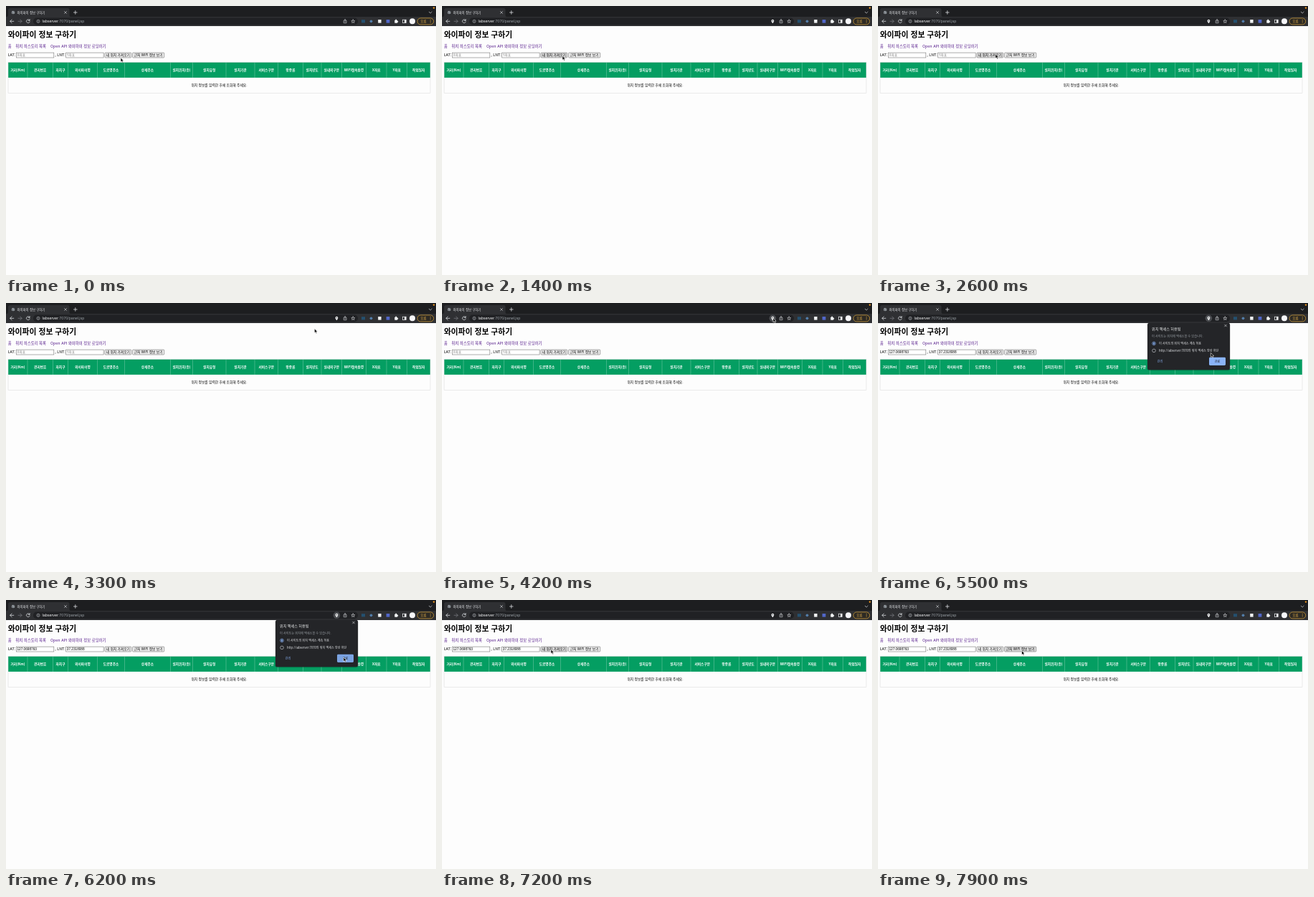
Write an HTML page that moves like this. It is 600x375 px and loops after 8 s.

```html
<!DOCTYPE html>
<html lang="ko">
<head>
<meta charset="utf-8">
<title>와이파이 정보 구하기</title>
<style>
html, body { margin: 0; width: 100%; height: 100%; overflow: hidden; background: #fdfdfd; }
svg { display: block; width: 600px; height: 375px; }
text { font-family: "Noto Sans CJK KR", "Noto Sans CJK", sans-serif; white-space: pre; }
.latin { font-family: "Liberation Sans", "Noto Sans CJK KR", sans-serif; }
</style>
</head>
<body>
<svg id="stage" viewBox="0 0 600 375" xmlns="http://www.w3.org/2000/svg"></svg>
<script>
const stage = document.getElementById('stage');
let parent = stage;

function add(tag, attrs, content) {
  const el = document.createElementNS(stage.namespaceURI, tag);
  for (const k in attrs) el.setAttribute(k, attrs[k]);
  if (content) el.textContent = content;
  parent.appendChild(el);
  return el;
}
const rect = (x, y, width, height, fill, more) => add('rect', { x, y, width, height, fill, ...more });
const circle = (cx, cy, r, fill, more) => add('circle', { cx, cy, r, fill, ...more });
const line = (d, stroke, w = 0.8, more) =>
  add('path', { d, stroke, 'stroke-width': w, fill: 'none', 'stroke-linecap': 'round', 'stroke-linejoin': 'round', ...more });
const label = (s, x, y, size, fill, more) => add('text', { x, y, 'font-size': size, fill, ...more }, s);
const bold = { 'font-weight': 700 };
const latin = { class: 'latin' };

function group(draw) {
  const outer = parent;
  const g = add('g', {});
  parent = g;
  draw();
  parent = outer;
  return g;
}
const show = (el, on) => el.setAttribute('visibility', on ? 'visible' : 'hidden');

// Browser frame
const ICON = '#dadce0';
rect(0, 0, 600, 375, '#fdfdfd');
rect(0, 0, 600, 28, '#1d1e20');
rect(0, 15, 600, 13, '#2f3033');
add('path', { d: 'M1 15Q3 15 3 13V5.500Q3 3 5.500 3H86Q88.500 3 88.500 5.500V13Q88.500 15 90.500 15Z', fill: '#2f3033' });
circle(10, 9, 2.3, '#9aa0a6');
line('M8.500 8.500L10 9.500L9.500 11M10.500 7L11.500 8.500', '#3c4043', 0.6);
label('와이파이 정보 구하기', 15.5, 10.6, 4.4, '#e8eaed');
line('M81.500 7.500l3 3m0-3l-3 3', ICON, 0.6);
line('M94.500 9h4.600M96.800 6.700v4.600', ICON, 0.8);
line('M590.300 8.200l1.900 1.800l1.900-1.800', ICON, 0.7);
circle(597, 2.6, 1.2, '#f29a1f');

line('M10.800 21.300H5.800M8.100 18.900L5.700 21.300L8.100 23.700', ICON);
line('M17 21.300H22M19.700 18.900L22.100 21.300L19.700 23.700', '#77797d');
line('M32.800 19.700A2.400 2.400 0 1 0 33.200 22M33.100 18.600V20.400H31.300', ICON);
rect(38, 16.5, 453, 9.8, '#202124', { rx: 4.9 });
circle(45, 21.3, 2.1, 'none', { stroke: '#bdc1c6', 'stroke-width': 0.6 });
line('M45 21.200V22.300M45 20.100V20.200', '#bdc1c6', 0.6);
const url = label('', 50.5, 23.2, 5.4, '#f1f3f4', latin);
[['labserver', '#f1f3f4'], [':7070/panel.jsp', '#9aa0a6']].forEach(([s, fill]) => {
  const span = document.createElementNS(stage.namespaceURI, 'tspan');
  span.setAttribute('fill', fill);
  span.textContent = s;
  url.appendChild(span);
});

const pinGlow = circle(461.4, 21.3, 4.8, '#4a4c50');
const pin = group(() => {
  add('path', { d: 'M461.400 24.200C459.900 22.200 459.500 21.500 459.500 20.700A1.900 1.900 0 0 1 463.300 20.700C463.300 21.500 462.900 22.200 461.400 24.200Z', fill: '#f1f3f4' });
  circle(461.4, 20.7, 0.65, '#202124');
});
line('M472 20.500H471.200V23.700H475V20.500H474.200M473.100 22V18.600M472 19.600L473.100 18.500L474.200 19.600', ICON, 0.6);

function starPath(cx, cy, r) {
  const pts = Array.from({ length: 10 }, (_, i) => {
    const a = Math.PI * (i / 5 - 0.5), q = i % 2 ? r * 0.45 : r;
    return (cx + q * Math.cos(a)).toFixed(2) + ' ' + (cy + q * Math.sin(a)).toFixed(2);
  });
  return 'M' + pts.join('L') + 'Z';
}
line(starPath(484.3, 21.5, 2.6), ICON, 0.6);

rect(496, 19.2, 5, 4.2, '#24506f');
circle(509.5, 21.3, 1.9, '#527ca8');
rect(519.2, 19, 4.4, 4.6, '#f1f3f4');
rect(530.6, 19, 4.8, 4.6, '#5267c9');
rect(542.3, 19.8, 3.9, 3.9, '#f1f3f4', { rx: 0.5 });
circle(544.2, 19.5, 0.9, '#f1f3f4');
circle(546.4, 21.8, 0.9, '#f1f3f4');
rect(553.6, 19.2, 4.6, 4.2, 'none', { stroke: '#f1f3f4', 'stroke-width': 0.7 });
rect(556, 19.2, 2.2, 4.2, '#f1f3f4');
circle(567, 21.3, 4, '#f7f7fa');
rect(574, 16.9, 22.7, 9, '#2d2a24', { rx: 4.5, stroke: '#e0a83c', 'stroke-width': 0.7 });
label('오류', 578.3, 23, 4.5, '#f0b84a');
[19.5, 21.3, 23.1].forEach(y => circle(592.2, y, 0.5, '#f0b84a'));

// Page
label('와이파이 정보 구하기', 2.7, 44, 10.8, '#000', bold);
[['홈', 2.7], ['위치 히스토리 목록', 13.3], ['Open API 와이파이 정보 로딩하기', 62]]
  .forEach(([s, x]) => label(s, x, 58.4, 5.4, '#551a8b'));
label('LAT:', 2.7, 70.2, 5.3, '#000');
label(', LNT:', 68.3, 70.2, 5.3, '#000');

function field(x, hint, value) {
  rect(x, 65.1, 52.4, 6.9, '#fff', { stroke: '#767676', 'stroke-width': 0.6 });
  return {
    hint: label(hint, x + 1.4, 70.2, 4.6, '#858585'),
    value: label(value, x + 1.1, 70.2, 4.7, '#000', latin)
  };
}
const fields = [field(14.4, 'X좌표', '127.0698763'), field(83.7, 'Y좌표', '37.2318088')];

function button(x, w, s) {
  const box = rect(x, 65.1, w, 6.9, '#efefef', { rx: 0.9, stroke: '#707070', 'stroke-width': 0.6 });
  label(s, x + w / 2, 70.2, 4.75, '#000', { 'text-anchor': 'middle' });
  return { box, x, w };
}
const buttons = [button(138, 36.7, '내 위치 가져오기'), button(176.6, 44.1, '근처 WIFI 정보 보기')];

const heads = '거리(Km) 관리번호 자치구 와이파이명 도로명주소 상세주소 설치위치(층) 설치유형 설치기관 서비스구분 망종류 설치년도 실내외구분 WIFI접속환경 X좌표 Y좌표 작업일자'.split(' ');
const cols = [3, 30, 65.5, 86.5, 127.5, 165.5, 229.5, 260.5, 307, 347, 379.5, 414.5, 440, 468.5, 502.5, 531, 559.5, 592];
rect(3, 78.5, 589, 21.4, '#049e62');
heads.forEach((s, i) => {
  label(s, (cols[i] + cols[i + 1]) / 2, 90.7, 4.7, '#fff', { ...bold, 'text-anchor': 'middle' });
  if (i) line(`M${cols[i]} 78.500V99.900`, '#9bd6bd', 0.4, { 'stroke-linecap': 'butt' });
});
rect(3, 78.5, 589, 43, 'none', { stroke: '#d8d8d8', 'stroke-width': 0.5 });
label('위치 정보를 입력한 후에 조회해 주세요.', 297.5, 112.2, 4.78, '#000', { 'text-anchor': 'middle', 'font-weight': 500 });

// Permission popup
let doneBox;
const popup = group(() => {
  rect(375.6, 28.2, 116, 66, '#000', { rx: 3, opacity: 0.2 });
  rect(376, 27.8, 115, 65.4, '#242528', { rx: 2.5 });
  label('위치 액세스 허용됨', 382, 37.9, 5.12, '#f1f3f4');
  line('M483.600 30.100l2.800 2.800m0-2.800l-2.800 2.800', ICON, 0.6);
  label('이 사이트는 위치에 액세스할 수 있습니다.', 382, 47.8, 4.15, '#9aa0a6');
  circle(385, 56.4, 2.3, 'none', { stroke: '#8ab4f8', 'stroke-width': 0.7 });
  circle(385, 56.4, 1.2, '#8ab4f8');
  label('이 사이트의 위치 액세스 계속 허용', 392, 58, 4.15, '#e8eaed');
  circle(385, 66.4, 2.3, 'none', { stroke: '#bdc1c6', 'stroke-width': 0.7 });
  label('http://labserver:7070의 위치 액세스 항상 차단', 392, 68, 4.13, '#e8eaed');
  label('관리', 389.7, 82.9, 4.1, '#8ab4f8');
  doneBox = rect(462, 75.8, 23, 11.2, '#8ab4f8', { rx: 1.4 });
  label('완료', 473.5, 83, 4.1, '#202124', { 'text-anchor': 'middle' });
});

const cursor = add('path', {
  d: 'M0 0V5.800L1.400 4.600L2.300 6.700L3.400 6.200L2.500 4.200H4.200Z',
  fill: '#000', stroke: '#fff', 'stroke-width': 0.6, 'stroke-linejoin': 'round'
});

// Pointer stops: ms, x, y
const path = [
  [0, 160, 72.2], [200, 164, 67.2], [900, 164, 67.2], [1400, 168, 69.5], [2100, 165, 68],
  [2300, 165, 68], [2600, 164, 67.2], [2700, 164, 67.2], [3400, 446, 34], [3600, 446, 34],
  [4100, 462, 21], [4500, 462, 21], [4700, 461, 59], [5400, 464, 69], [6200, 471, 80],
  [6300, 471, 80], [6700, 147, 68.5], [6900, 147, 68.5], [7200, 152, 69], [7800, 199.8, 73.8],
  [7900, 200.5, 70.6], [8000, 200.5, 70.6]
];
const LOOP = 8000, STEP = 100;
const PIN_AT = 700, FIX_AT = 4400, OPEN_AT = 4500, CLOSE_AT = 6400;

function pointer(t) {
  const i = path.findIndex(p => p[0] > t);
  const [t0, x0, y0] = path[i - 1], [t1, x1, y1] = path[i];
  const u = (t - t0) / (t1 - t0), k = u * u * (3 - 2 * u);
  return [x0 + (x1 - x0) * k, y0 + (y1 - y0) * k];
}

function render(ms) {
  const t = Math.floor((ms % LOOP) / STEP) * STEP;
  const [x, y] = pointer(t);
  const open = t >= OPEN_AT && t < CLOSE_AT;
  const fixed = t >= FIX_AT;
  cursor.setAttribute('transform', `translate(${x} ${y})`);
  show(popup, open);
  show(pin, t >= PIN_AT);
  show(pinGlow, open || Math.hypot(x - 461.4, y - 21.3) < 5);
  fields.forEach(f => { show(f.hint, !fixed); show(f.value, fixed); });
  buttons.forEach(b => {
    const over = x >= b.x && x <= b.x + b.w && y >= 65 && y <= 72;
    b.box.setAttribute('fill', over ? '#dcdcdc' : '#efefef');
  });
  doneBox.setAttribute('fill', x > 462 && y > 75.8 ? '#7ba3e2' : '#8ab4f8');
}

const start = performance.now();
function tick() {
  render(Math.max(0, performance.now() - start));
  requestAnimationFrame(tick);
}
render(0);
tick();
</script>
</body>
</html>
```
